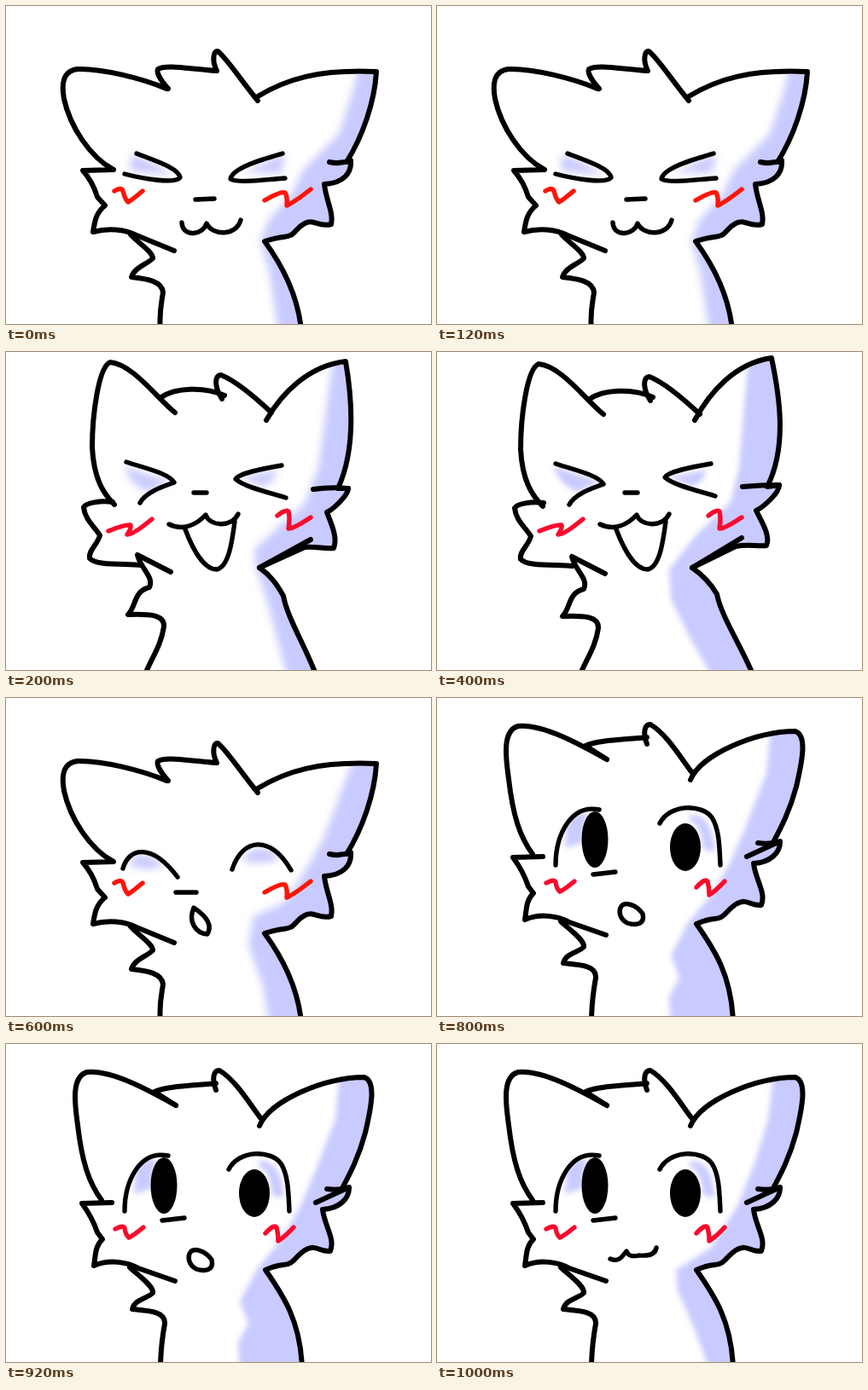
An HTML page without scripts for the animation above (1200 ms loop, 498 by 373 pixels).

```html
<!DOCTYPE html>
<html lang="en">
<head>
<meta charset="utf-8">
<title>Cat loop</title>
<style>
html, body { margin: 0; width: 100%; height: 100%; overflow: hidden; background: #fff; }
svg { display: block; width: 100%; height: 100%; }
path { fill: none; stroke: #000; stroke-width: 5.4; stroke-linecap: round; stroke-linejoin: round; }
.line, .edge { stroke-width: 6; }
.edge { fill: #fff; }
.shade { fill: #c9caff; stroke: none; }
.blush { stroke: #ff1408; }
.pink { stroke: #fb0a2c; }
.pose { visibility: hidden; animation: show 1.2s step-end infinite; animation-delay: calc((var(--i) - 6) * 200ms); }
@keyframes show { 0% { visibility: visible; } 16.6666%, 100% { visibility: hidden; } }
</style>
</head>
<body>
<svg viewBox="0 0 498 373" preserveAspectRatio="none">
<defs>
  <filter id="soft" filterUnits="userSpaceOnUse" x="-30" y="-30" width="560" height="440"><feGaussianBlur stdDeviation="5"/></filter>
  <filter id="crisp" filterUnits="userSpaceOnUse" x="-30" y="-30" width="560" height="440"><feGaussianBlur stdDeviation="3"/></filter>

  <!-- The .edge paths run off stage so their white fill trims the shading -->
  <g id="wide">
    <path class="edge" d="M295 106C328 86 366 74 434 77C432 112 418 153 399 183L404 182C405 196 395 208 373 209C375 228 384 242 381 256C366 260 361 249 350 255C340 260 339 267 333 269C328 272 326 269 303 276C325 306 342 340 346 380H530V-30H295"/>
    <path class="line" d="M379 183Q391 186 404 181"/>
    <path class="line" d="M188 97C160 85 112 73 84 74C66 76 65 92 68 109C75 141 98 177 126 192L90 193C99 203 104 214 107 224L116 234C105 243 104 253 102 265C120 260 139 262 153 269L197 287"/>
    <path class="line" d="M190 97C181 87 176 78 178 74C188 68 215 74 247 76C241 64 243 53 248 53C257 59 276 88 295 111"/>
    <path class="line" d="M146 268C156 279 172 288 172 296C164 304 151 306 147 318C166 320 183 323 184 336C182 350 179 360 181 380"/>
  </g>

  <g id="earTop">
    <path class="line" d="M198 71C177 54 148 14 122 12C108 18 101 76 101 112C103 149 114 166 127 179"/>
    <path class="line" d="M182 53C198 42 232 40 256 51M253 55C244 41 244 27 252 27C272 35 295 56 311 71"/>
  </g>
  <path id="cheek" class="line" d="M125 176C110 174 94 177 91 182C92 196 104 205 110 215C108 225 96 233 98 242C106 251 138 248 159 250"/>
  <path id="chest" class="line" d="M193 258L154 238C157 253 174 264 168 276C149 281 153 298 143 308C168 307 186 308 185 322C182 344 170 360 163 378"/>

  <g id="up">
    <path class="edge" d="M305 80C323 48 355 16 398 11C405 52 411 112 389 160L401 160C401 168 384 184 376 188C381 201 389 218 384 230C372 231 364 228 350 229L297 253C310 262 317 272 325 286C329 310 350 344 363 378H530V-30H305"/>
    <path class="line" d="M360 161Q380 158 401 160M357 220L297 253"/>
    <use href="#earTop"/><use href="#cheek"/><use href="#chest"/>
  </g>
  <g id="up2">
    <path class="edge" d="M302 80C319 48 349 13 392 7C401 50 411 110 387 158L401 156C401 166 382 182 374 186C381 200 391 216 386 227C374 228 364 225 350 228L299 253C312 262 321 272 328 284C333 310 356 344 370 378H530V-30H302"/>
    <path class="line" d="M358 158Q380 156 401 156M357 218L299 253"/>
    <use href="#earTop" x="-3" y="2"/><use href="#cheek" y="1"/><use href="#chest" x="4" y="2"/>
  </g>

  <g id="calm">
    <path class="edge" d="M297 96C309 66 374 39 420 39C434 44 428 74 421 104C413 134 402 154 393 171L402 169C402 181 391 193 371 194C373 213 386 228 380 243C366 244 364 234 350 242C339 249 337 259 325 259Q315 260 304 265C325 295 345 325 347 380H530V-30H297"/>
    <path class="line" d="M376 170Q390 172 402 168L363 186"/>
    <path class="line" d="M199 72C172 57 125 30 95 33C77 38 80 67 84 95C89 138 97 163 112 183M124 186L89 187C98 199 104 212 107 221L113 229C104 237 105 249 103 260C121 252 143 256 155 263L198 278"/>
    <path class="line" d="M199 72L174 56C190 49 220 49 246 46M246 54C241 41 243 31 250 31C269 42 286 71 300 89"/>
    <path class="line" d="M145 262C157 273 173 284 172 292C165 299 151 299 148 311C169 313 187 314 186 328C183 345 181 360 181 380"/>
  </g>

  <path id="wideMarks" class="blush" d="M127 217Q135 212 137 217Q140 228 143 230Q147 228 160 217M303 228Q322 217 327 219Q330 224 329 234Q338 230 357 215"/>
  <path id="upMarks" class="pink" d="M120 210Q140 202 146 203Q147 207 142 214Q148 215 171 196M318 192Q328 184 331 187Q333 196 331 207Q336 208 357 194"/>

  <path id="leftEye" d="M141 129C165 137 190 142 197 153C184 158 164 164 157 177"/>
  <path id="rightEye" d="M323 133C300 137 273 142 269 149C279 158 305 164 328 171"/>
  <path id="muzzle" d="M220 165H235M191 202C207 210 223 203 234 191C238 204 264 207 272 190M210 208C219 232 232 255 247 255C261 252 265 222 268 199"/>
  <path id="upEyeShade" class="shade" d="M138 134L194 152L166 164Q146 156 138 134M273 147L318 138Q314 154 300 158Z"/>

  <g id="calmEyes">
    <path d="M139 196C139 162 156 124 190 131M261 147C273 124 310 124 322 140C331 154 331 176 332 196M183 207L209 204"/>
    <ellipse cx="185" cy="166" rx="15.5" ry="33"/><ellipse cx="291" cy="175" rx="18" ry="28"/>
    <path class="pink" d="M128 217Q137 212 139 216Q140 224 144 227Q149 225 161 215M304 222Q314 211 317 215Q319 222 319 231Q327 226 337 215"/>
  </g>
  <path id="calmEyeShade" class="shade" d="M152 148Q162 132 176 134L170 170L150 176ZM296 137Q322 134 326 180L312 178Q310 150 296 143Z"/>
</defs>

<g class="pose" style="--i:0">
  <g filter="url(#soft)">
    <path class="shade" d="M416 60L406 100L390 150L348 192L334 222L308 250L298 276L308 310L320 390H400V280L460 180V60Z"/>
    <path class="shade" d="M146 174Q174 182 196 198L146 194ZM328 172L278 195L322 196Z"/>
  </g>
  <use href="#wide"/><use href="#wideMarks"/>
  <path d="M153 173C176 182 202 190 204 201C199 209 162 203 139 197M324 173C300 180 265 190 263 203C272 208 300 204 327 202M222 227L244 226"/>
  <path d="M206 254C207 272 231 269 235 255C242 270 270 270 275 251"/>
</g>

<g class="pose" style="--i:1">
  <g filter="url(#soft)">
    <path class="shade" d="M384 0L376 60L366 135L350 178L318 206L290 233L294 255L308 300L332 390H400V240L440 150V0Z"/>
    <use href="#upEyeShade"/>
  </g>
  <use href="#up"/><use href="#upMarks"/>
  <use href="#leftEye"/><use href="#rightEye"/><use href="#muzzle"/>
</g>

<g class="pose" style="--i:2">
  <g filter="url(#crisp)">
    <path class="shade" d="M366 0L360 60L354 135L344 176L304 214L272 255L274 290L296 335L328 390H400V240L440 150V0Z"/>
    <use href="#upEyeShade" x="-2"/>
  </g>
  <use href="#up2"/><use href="#upMarks"/>
  <use href="#leftEye" x="-2" y="2"/><use href="#rightEye" x="-2" y="-2"/><use href="#muzzle"/>
</g>

<g class="pose" style="--i:3">
  <g filter="url(#soft)">
    <path class="shade" d="M412 60L396 100L372 165L352 200L326 240L290 256L284 290L300 335L310 390H400V280L460 180V60Z"/>
    <path class="shade" d="M143 194Q158 172 186 196Q160 206 143 194M275 190Q298 162 322 188Q298 198 275 190"/>
  </g>
  <use href="#wide"/><use href="#wideMarks"/>
  <path d="M137 200C144 175 171 170 201 210M265 201C277 164 310 160 334 202M199 228H223"/>
  <path d="M220 246C213 262 222 276 236 277C243 265 232 254 220 246Z"/>
</g>

<g class="pose" style="--i:4">
  <g filter="url(#crisp)">
    <path class="shade" d="M392 20L386 88L362 150L344 192L322 230L294 264L274 302L284 328L272 350L274 390H400V260L460 160V20Z"/>
    <use href="#calmEyeShade"/>
  </g>
  <use href="#calm"/><use href="#calmEyes"/>
  <path d="M215 246C219 237 234 243 241 253C244 266 233 267 223 264C214 259 213 251 215 246Z"/>
</g>

<g class="pose" style="--i:5">
  <g filter="url(#crisp)">
    <path class="shade" d="M396 20L388 88L372 140L352 190L322 238L280 265L282 290L300 330L322 390H400V260L460 160V20Z"/>
    <use href="#calmEyeShade"/>
  </g>
  <use href="#calm"/><use href="#calmEyes"/>
  <path d="M203 252C212 256 216 251 222 243C225 250 230 249 237 248C250 249 256 246 257 239"/>
</g>
</svg>
</body>
</html>
```
